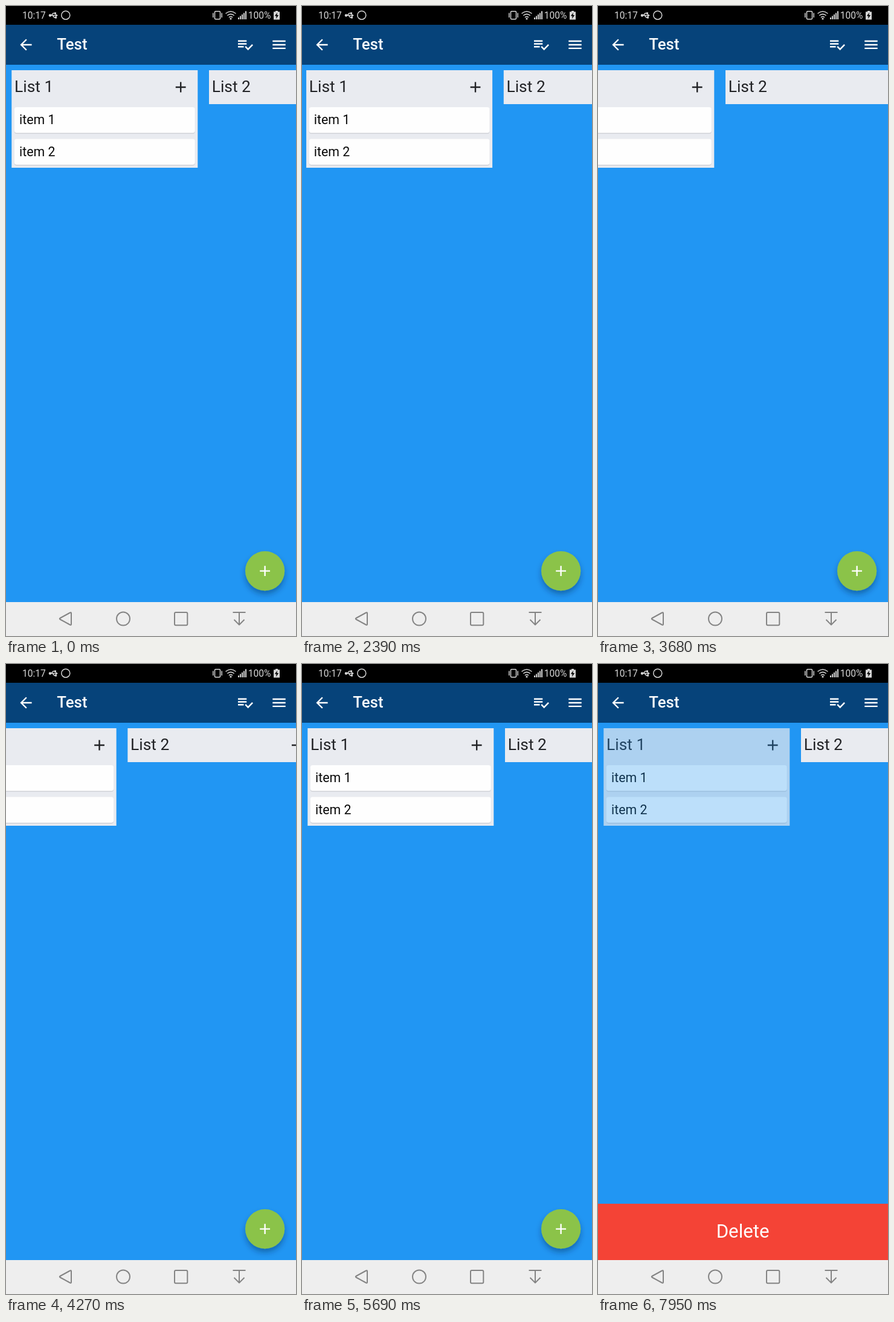
Write an HTML page that moves like this. It is 480 px wide and 1040 px high and loops after 8 s.

```html
<!DOCTYPE html>
<html lang="en">
<head>
<meta charset="utf-8">
<title>Board</title>
<style>
  html, body { margin: 0; width: 100%; height: 100%; overflow: hidden; background: #2196f3; }
  svg { display: block; width: 100%; height: 100%; }
  text { font-family: Roboto, Arial, sans-serif; }
  .status { fill: #d6d6d6; }
  .status text { font-size: 15.6px; }
  .line { fill: none; stroke: #d6d6d6; stroke-width: 1.5; }
  .list { fill: #e9ebf0; }
  .head { font-size: 26.4px; fill: #212225; }
  .item { font-size: 21.3px; fill: #080808; }
  .plus { fill: none; stroke: #212225; stroke-width: 2.4; }
  .nav { fill: none; stroke: #848484; stroke-width: 2; stroke-linejoin: round; }
</style>
</head>
<body>
<svg viewBox="0 0 480 1040" preserveAspectRatio="none">
  <defs>
    <filter id="soft" x="-30%" y="-30%" width="160%" height="170%">
      <feDropShadow dx="0" dy="6" stdDeviation="5" flood-color="#002850" flood-opacity=".4"/>
    </filter>
    <path id="add" d="M-8.4 0H8.4M0-8.4V8.4"/>
    <g id="card">
      <rect y="1" width="299" height="43" rx="4" fill="#d0d2d8"/>
      <rect width="299" height="42.5" rx="4" fill="#fefefe"/>
    </g>
  </defs>

  <rect width="480" height="1040" fill="#2196f3"/>

  <g id="board">
    <g id="first">
      <rect class="list" x="9.3" y="106" width="308" height="161"/>
      <text class="head" x="14" y="142">List 1</text>
      <use class="plus" href="#add" x="289.2" y="134"/>
      <use href="#card" x="13.8" y="167"/>
      <use href="#card" x="13.8" y="219.5"/>
      <text class="item" x="22" y="195">item 1</text>
      <text class="item" x="22" y="247.5">item 2</text>
    </g>
    <rect class="list" x="336" y="106" width="308" height="56"/>
    <text class="head" x="340.7" y="142">List 2</text>
    <use class="plus" href="#add" x="616" y="134"/>
  </g>

  <rect y="31" width="480" height="66" fill="#06437a"/>
  <g fill="#fff">
    <path transform="translate(18.6 49.6) scale(1.2)" d="M20 11H7.83l5.59-5.59L12 4l-8 8 8 8 1.41-1.41L7.83 13H20z"/>
    <text x="84.2" y="72" font-size="25.8" font-weight="500">Test</text>
    <path transform="translate(381.6 49.4) scale(1.19)" d="M14 10H2v2h12zM14 6H2v2h12zM2 16h8v-2H2zM21.5 11.5L23 13l-6.99 7-4.51-4.5L13 14l3.01 3z"/>
    <path transform="translate(437.7 49.7) scale(1.19)" d="M3 18h18v-2H3zM3 13h18v-2H3zM3 6v2h18V6z"/>
  </g>

  <rect width="480" height="31" fill="#000"/>
  <g class="status">
    <text x="27" y="21">10:17</text>
    <text x="400.8" y="21">100%</text>
    <path class="line" d="M72 15.5H84M75 15.5l3-3.5h3M77 15.5l3 3.5h2"/>
    <circle cx="73" cy="15.5" r="2.2"/>
    <path d="M82 13l4 2.5-4 2.5zM80 10.5h3v3h-3zM81 17.5h3v3h-3z"/>
    <circle class="line" cx="98.8" cy="15.2" r="7"/>
    <rect class="line" x="345.5" y="8.8" width="9" height="13" rx="1.5"/>
    <path class="line" d="M342.8 11.5v7.5M357.2 11.5v7.5"/>
    <path class="line" d="M363.5 12.5Q372 5.5 380.5 12.5M366.3 15.8Q372 11 377.7 15.8M369 18.8Q372 16.4 375 18.8"/>
    <circle cx="372" cy="21" r="1.6"/>
    <path d="M384 22v-3h2v3zM387 22v-5.5h2V22zM390 22v-8h2v8zM393 22v-10.5h2V22zM396 22V8.5h2V22z"/>
    <path d="M443 9.5h3V8h4v1.5h3V22.5h-10z"/>
    <path d="M449 11l-4.2 5.5h2.8L447 21l4.2-6h-2.8z" fill="#000"/>
  </g>

  <g id="fab">
    <circle r="32.6" fill="#8bc34a" filter="url(#soft)"/>
    <use href="#add" fill="none" stroke="#fff" stroke-width="2.4"/>
  </g>

  <g id="bin">
    <rect y="891" width="480" height="94" fill="#f44336"/>
    <text x="239.6" y="947" text-anchor="middle" font-size="31.2" fill="#fff">Delete</text>
  </g>

  <rect y="984" width="480" height="56" fill="#eee"/>
  <g class="nav">
    <path d="M89.5 1012.5Q88 1011.5 89.5 1010.5L106 1001.5Q108 1000.5 108 1002.5V1020.5Q108 1022.5 106 1021.5Z"/>
    <circle cx="194" cy="1011.6" r="11"/>
    <rect x="279" y="1001" width="21.3" height="21.3" rx="2"/>
    <path d="M375.5 1001H396.5M386 1001V1021.5M377.5 1013L386 1021.5L394.5 1013"/>
  </g>
</svg>
<script>
  const LOOP = 8000, TOUCH = 1790, DRAG = 3220, PRESS = 7650;
  const byId = id => document.getElementById(id);
  const board = byId('board'), first = byId('first'), fab = byId('fab'), bin = byId('bin');

  // [time, offset]: the finger rests, pulls the board left, lingers and lets it return.
  const scroll = [
    [0, 0], [TOUCH - 1, 0], [TOUCH, 2.2], [DRAG - 1, 2.2], [DRAG, 4.5], [DRAG + 20, 4.5],
    [3680, 125], [3780, 125], [4850, 147], [4950, 147], [5600, 0], [LOOP, 0]
  ];

  const clamp = v => Math.max(0, Math.min(1, v));
  const smooth = v => v * v * (3 - 2 * v);

  function track(keys, t) {
    const i = keys.findIndex(k => k[0] > t);
    const [t0, a] = keys[i - 1], [t1, b] = keys[i];
    return a + (b - a) * smooth((t - t0) / (t1 - t0));
  }

  function draw(t) {
    board.setAttribute('transform', `translate(${-track(scroll, t)} 0)`);
    first.setAttribute('opacity', t < PRESS ? 1 : 0.7);

    const rise = 1 - (1 - clamp((t - PRESS) / 250)) ** 3;
    const size = 1 - smooth(clamp((t - PRESS) / 200));
    bin.setAttribute('transform', `translate(0 ${94 * (1 - rise)})`);
    bin.setAttribute('visibility', t < PRESS ? 'hidden' : 'visible');
    fab.setAttribute('transform', `translate(428.6 932.6) scale(${size})`);
    fab.setAttribute('visibility', size > 0 ? 'visible' : 'hidden');
  }

  const start = performance.now();
  function tick() {
    draw((performance.now() - start) % LOOP);
    requestAnimationFrame(tick);
  }
  tick();
</script>
</body>
</html>
```
